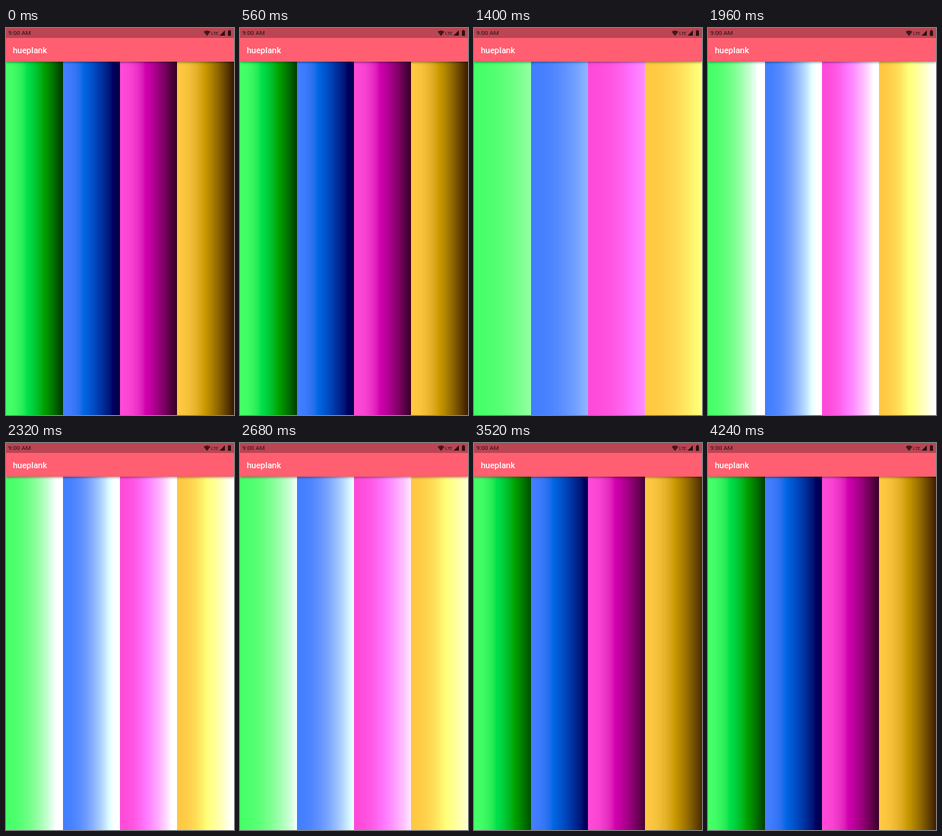
Recreate the animation shown at these times as an HTML page with a canvas. Size 300 by 506 pixels, loop 4360 ms.

```html
<!DOCTYPE html>
<html lang="en">
<head>
<meta charset="utf-8">
<title>Colour columns</title>
<style>
  html, body { margin: 0; width: 100%; height: 100%; overflow: hidden; background: #fff; }
  #stage { position: relative; width: 300px; height: 506px; overflow: hidden; font-family: Roboto, "Open Sans", sans-serif; }
  #columns { position: absolute; left: 0; top: 44px; display: block; }
  .status { position: absolute; left: 0; top: 0; width: 300px; height: 13px; background: #bb4553; }
  .appbar { position: absolute; left: 0; top: 13px; width: 300px; height: 31px; background: #ff5f70; box-shadow: 0 1px 3px rgba(0, 0, 0, .45); }
  .clock { position: absolute; left: 3px; top: 2px; font-size: 8px; line-height: 10px; color: #2a1013; white-space: nowrap; }
  .title { position: absolute; left: 9px; top: 10px; font-size: 11px; font-weight: 500; line-height: 13px; color: #fff; }
  .icons { position: absolute; left: 0; top: 0; }
</style>
</head>
<body>
<div id="stage">
  <canvas id="columns" width="300" height="462"></canvas>
  <div class="appbar"><div class="title">hueplank</div></div>
  <div class="status">
    <div class="clock">9:00 AM</div>
    <svg class="icons" width="300" height="13" fill="#2a1013">
      <path d="M260 4.8Q264.5 1.6 269 4.8L264.5 10.4Z" opacity=".85"/>
      <text x="270" y="9.3" font-size="6" font-family="Roboto, sans-serif">LTE</text>
      <path d="M281 10L288 3V10Z"/>
      <path d="M292 3.6H293V2.8H295V3.6H296V10.2H292Z"/>
    </svg>
  </div>
</div>
<script>
const LOOP = 4360, STEP = 40, LAST = 4240, WIDTH = 75;
const BASES = [[70, 255, 104], [66, 126, 255], [255, 74, 216], [255, 200, 66]];
const WHITE = [0.9505, 1, 1.089];

// Time in ms and lightness shift at each column's right edge.
const KEYS = [
  [0, -73], [400, -75], [780, -60], [1000, -37], [1400, 22], [1960, 72],
  [2180, 75], [2680, 52], [3100, -8], [3520, -64], [3900, -74], [4240, -70], [4360, -73]
];

const toLinear = v => (v /= 255) <= 0.04045 ? v / 12.92 : ((v + 0.055) / 1.055) ** 2.4;
const toByte = v => {
  v = Math.min(1, Math.max(0, v));
  return Math.round(255 * (v <= 0.0031308 ? 12.92 * v : 1.055 * v ** (1 / 2.4) - 0.055));
};
const compress = v => v > 0.008856 ? Math.cbrt(v) : 7.787 * v + 16 / 116;
const expand = v => v > 0.206893 ? v ** 3 : (v - 16 / 116) / 7.787;

// Lab lightness moves all three compressed axes by the same amount.
function toAxes(rgb) {
  const [r, g, b] = rgb.map(toLinear);
  return [
    0.4124 * r + 0.3576 * g + 0.1805 * b,
    0.2126 * r + 0.7152 * g + 0.0722 * b,
    0.0193 * r + 0.1192 * g + 0.9505 * b
  ].map((v, i) => compress(v / WHITE[i]));
}

function shade(axes, shift) {
  const [x, y, z] = axes.map((v, i) => expand(v + shift / 116) * WHITE[i]);
  const rgb = [
    3.2406 * x - 1.5372 * y - 0.4986 * z,
    -0.9689 * x + 1.8758 * y + 0.0415 * z,
    0.0557 * x - 0.204 * y + 1.057 * z
  ];
  return `rgb(${rgb.map(toByte).join()})`;
}

function slope(i) {
  const a = KEYS[Math.max(0, i - 1)], b = KEYS[Math.min(KEYS.length - 1, i + 1)];
  return (b[1] - a[1]) / (b[0] - a[0]);
}

// Smooth cubic through the keys.
function shiftAt(time) {
  let i = 0;
  while (i < KEYS.length - 2 && time >= KEYS[i + 1][0]) i++;
  const [t0, v0] = KEYS[i], [t1, v1] = KEYS[i + 1];
  const span = t1 - t0, u = (time - t0) / span, w = 1 - u;
  return w * w * (1 + 2 * u) * v0 + u * u * (3 - 2 * u) * v1 +
    span * u * w * (w * slope(i) - u * slope(i + 1));
}

const ctx = document.getElementById("columns").getContext("2d");
const columns = BASES.map(toAxes);

function draw(time) {
  const shift = shiftAt(time);
  columns.forEach((axes, c) => {
    for (let x = 0; x < WIDTH; x++) {
      const u = (x + 0.5) / WIDTH;
      ctx.fillStyle = shade(axes, shift * u * u);
      ctx.fillRect(c * WIDTH + x, 0, 1, 462);
    }
  });
}

const start = performance.now();
function tick() {
  const time = (performance.now() - start) % LOOP;
  draw(Math.min(LAST, Math.floor(time / STEP) * STEP));
  requestAnimationFrame(tick);
}
tick();
</script>
</body>
</html>
```
